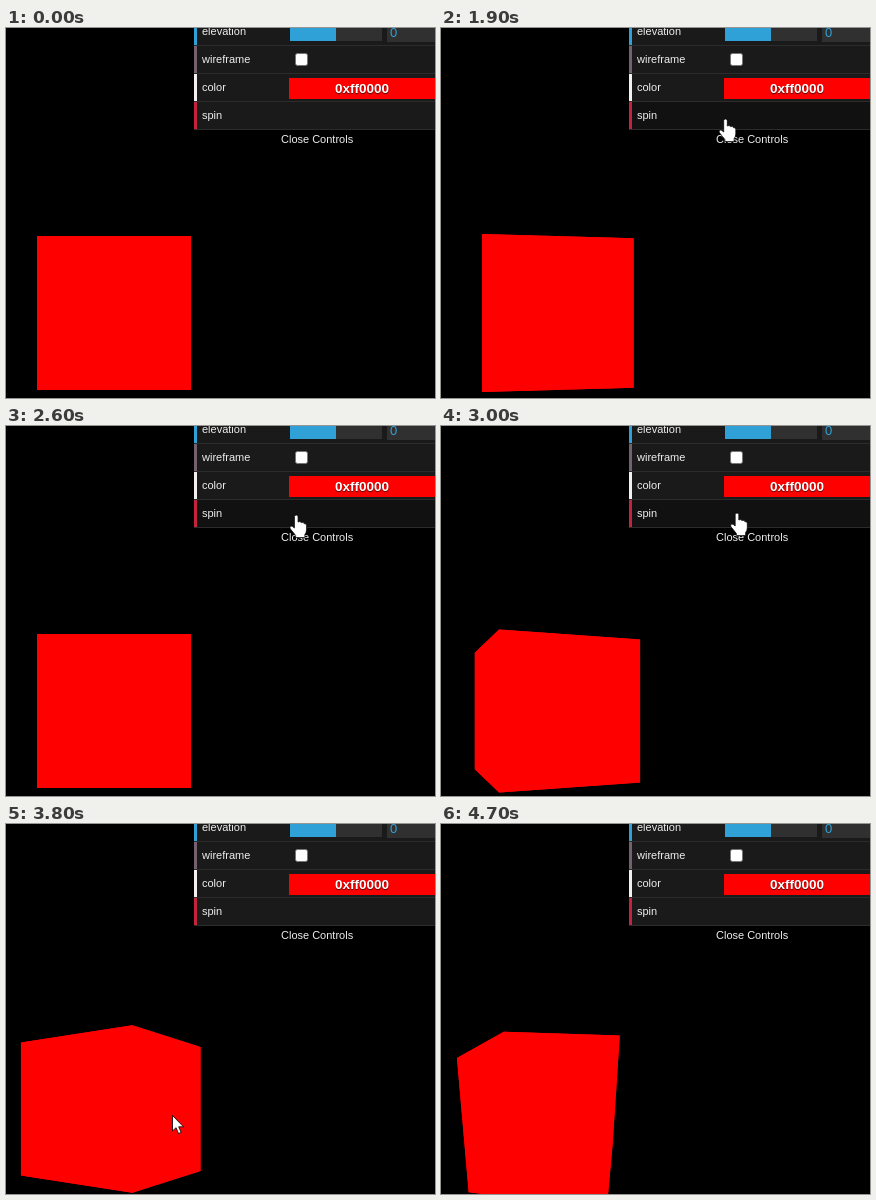
Write an HTML page with a canvas that moves like this. It is 429 px wide and 370 px high and loops after 4.8 s.

```html
<!DOCTYPE html>
<html lang="en">
<head>
<meta charset="utf-8">
<title>Cube controls</title>
<style>
  html, body { margin: 0; width: 100%; height: 100%; overflow: hidden; background: #000; }
  canvas, svg { position: absolute; left: 0; top: 0; display: block; }
  text { font: 11px "Liberation Sans", Arial, sans-serif; fill: #eee; }
  .row { fill: #1a1a1a; }
  .row.hover { fill: #111; }
  .bar { fill: #000; }
  .bar.hover { fill: #111; }
  .value { font-size: 13px; fill: #2fa1d6; }
  .hex { font-size: 13.5px; font-weight: bold; fill: #fff; text-anchor: middle; text-shadow: 0 1px 1px rgba(0, 0, 0, .7); }
  #cursor path { fill: #fff; stroke: #000; stroke-linejoin: round; }
</style>
</head>
<body>
<canvas id="scene" width="429" height="370"></canvas>
<svg width="429" height="370" viewBox="0 0 429 370">
  <rect class="row" x="188" y="0" width="241" height="74"/>
  <rect class="row" id="spin" x="188" y="74" width="241" height="27"/>
  <rect class="bar" id="close" x="188" y="102" width="241" height="20"/>
  <path d="M188 17.5H429M188 45.5H429M188 73.5H429M188 101.5H429" stroke="#2c2c2c"/>

  <rect x="188" y="0" width="3" height="17" fill="#2fa1d6"/>
  <rect x="188" y="18" width="3" height="27" fill="#75606f"/>
  <rect x="188" y="46" width="3" height="27" fill="#f4f0f2"/>
  <rect x="188" y="74" width="3" height="27" fill="#c4233d"/>

  <text x="196" y="7">elevation</text>
  <text x="196" y="35">wireframe</text>
  <text x="196" y="63">color</text>
  <text x="196" y="91">spin</text>
  <text x="275" y="115">Close Controls</text>

  <rect x="284" y="0" width="92" height="13" fill="#303030"/>
  <rect x="284" y="0" width="46" height="13" fill="#2fa1d6"/>
  <rect x="381" y="0" width="48" height="14" fill="#303030"/>
  <text class="value" x="384" y="9">0</text>
  <rect x="289.5" y="25.5" width="12" height="12" rx="2" fill="#fff" stroke="#767676"/>
  <rect x="283" y="50" width="146" height="21" fill="#f00"/>
  <text class="hex" x="356" y="65">0xff0000</text>

  <g id="cursor">
    <path id="arrow" stroke-width=".8" d="M0 0V15.5L3.6 12.2L6 18L8.6 16.9L6.2 11.3H11Z"/>
    <path id="hand" stroke-width=".7" d="M-1.8 1.5Q-1.6 0 0 0Q1.7 0 1.8 1.7V7Q4 5.8 5 7.6Q7 6.8 7.8 8.6Q10 8 10.3 10.5V15Q10 18 8.6 19.5V22.5H-.6V20.5L-6 13.8Q-7 11.8-5.4 11Q-4.2 10.6-1.8 13Z"/>
  </g>
</svg>
<script>
const LOOP = 4800, STEP = 100;
const CENTER = [108, 285], FOCAL = 385, DISTANCE = 6;
const CLICKS = [1613, 2692, 3591], SPIN_TIME = 928;

// time, x, y of the pointer tip
const TRACK = [
  [500, 420, 250], [1000, 282, 106], [1300, 284.5, 91], [2500, 284.5, 91],
  [2700, 296, 87], [3600, 296, 87], [3800, 166.5, 291.5], [3900, 166.5, 291.5],
  [4600, 150, 372]
];

const FACES = [
  [0, 1, 3, 2], [4, 5, 7, 6], [0, 1, 5, 4],
  [2, 3, 7, 6], [0, 2, 6, 4], [1, 3, 7, 5]
];

const find = id => document.getElementById(id);
const ctx = find("scene").getContext("2d");
const clamp = v => Math.min(1, Math.max(0, v));
const smooth = v => v * v * (3 - 2 * v);
const easeOut = v => 1 - (1 - v) ** 2;
const rad = deg => deg * Math.PI / 180;

function project(i, yaw, pitch) {
  const x = i & 1 ? 1 : -1, y = i & 2 ? 1 : -1, z = i & 4 ? 1 : -1;
  const rx = x * Math.cos(yaw) + z * Math.sin(yaw);
  const rz = z * Math.cos(yaw) - x * Math.sin(yaw);
  const ry = y * Math.cos(pitch) - rz * Math.sin(pitch);
  const depth = y * Math.sin(pitch) + rz * Math.cos(pitch);
  const scale = FOCAL / (DISTANCE - depth);
  return [CENTER[0] + rx * scale, CENTER[1] - ry * scale];
}

function drawCube(t) {
  const orbit = smooth(clamp((t - 3900) / 800));
  const spin = CLICKS.reduce((sum, c) => sum + 360 * easeOut(clamp((t - c) / SPIN_TIME)), 0);
  const yaw = rad(spin - 11 * orbit), pitch = rad(21 * orbit);
  const points = Array.from({ length: 8 }, (_, i) => project(i, yaw, pitch));
  ctx.fillStyle = "#000";
  ctx.fillRect(0, 0, 429, 370);
  ctx.fillStyle = "#f00";
  for (const face of FACES) {
    ctx.beginPath();
    face.forEach(i => ctx.lineTo(...points[i]));
    ctx.fill();
  }
}

function pointerAt(t) {
  const next = TRACK.findIndex(k => k[0] > t);
  if (next < 1) return null;
  const [t0, x0, y0] = TRACK[next - 1], [t1, x1, y1] = TRACK[next];
  const p = (t - t0) / (t1 - t0);
  return [x0 + (x1 - x0) * p, y0 + (y1 - y0) * p];
}

function drawPointer(t) {
  const tip = pointerAt(t);
  const [x, y] = tip || [-50, -50];
  const inside = x >= 188;
  const onSpin = inside && y >= 74 && y < 101;
  const onClose = inside && y >= 101 && y < 122;
  const hand = onSpin || onClose;
  find("spin").classList.toggle("hover", onSpin);
  find("close").classList.toggle("hover", onClose);
  find("cursor").setAttribute("transform", `translate(${x} ${y})`);
  find("cursor").style.display = tip ? "" : "none";
  find("hand").style.display = hand ? "" : "none";
  find("arrow").style.display = hand ? "none" : "";
}

const start = performance.now();

function frame() {
  const elapsed = (performance.now() - start) % LOOP;
  const t = Math.floor(elapsed / STEP) * STEP;
  drawCube(t);
  drawPointer(t);
  requestAnimationFrame(frame);
}
frame();
</script>
</body>
</html>
```
